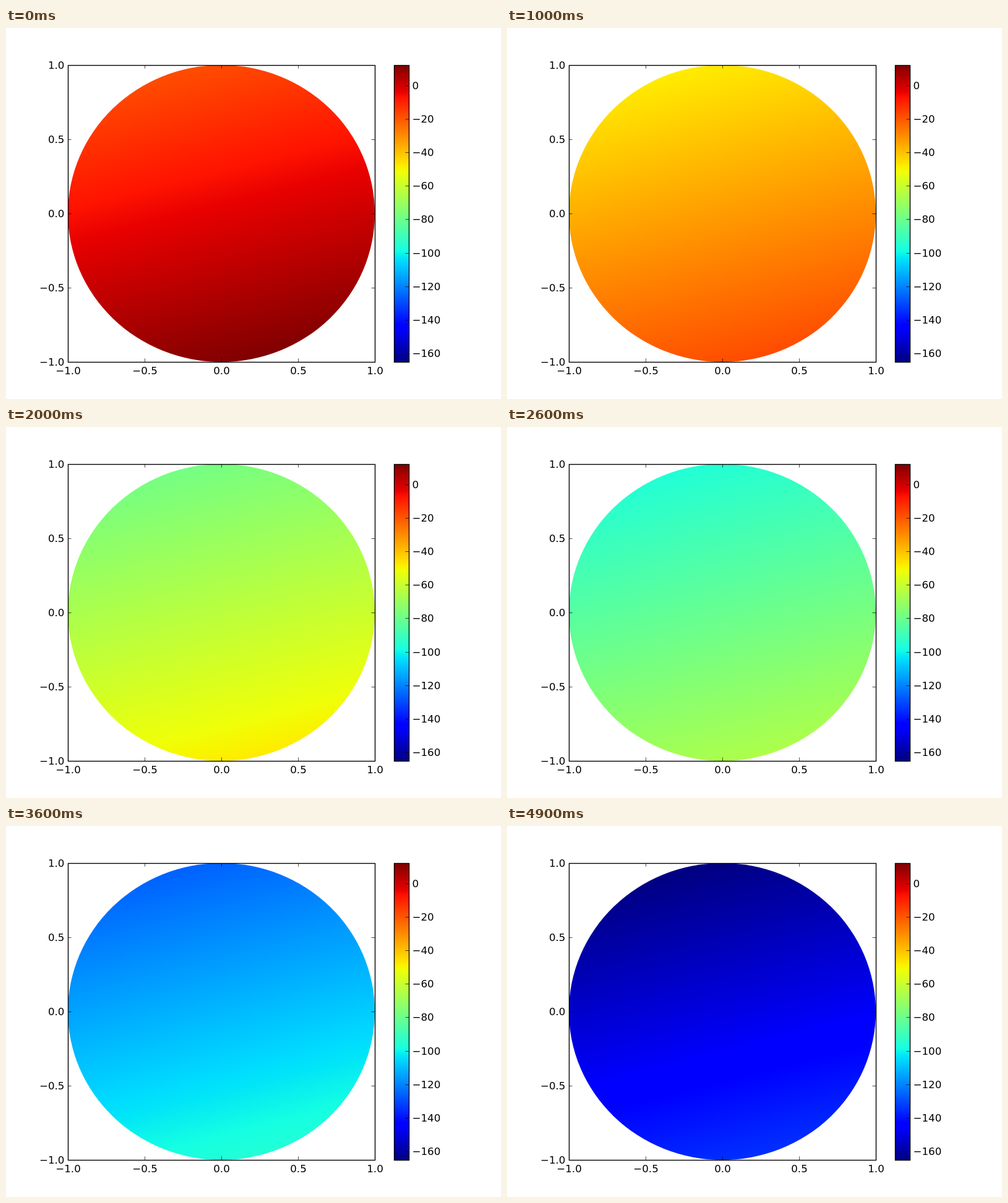
Animation of 800x600 px, one loop 5000 ms. Source, as an HTML page with a canvas:

```html
<!DOCTYPE html>
<html lang="en">
<head>
<meta charset="utf-8">
<title>Tilting field</title>
<style>
  html, body { margin: 0; width: 100%; height: 100%; overflow: hidden; background: #fff; }
  canvas { display: block; }
</style>
</head>
<body>
<canvas id="stage" width="800" height="600"></canvas>
<script>
const ctx = document.getElementById('stage').getContext('2d');
const LOOP = 5000, STEP = 100;
const MIN = -165.2, MAX = 12.2;
const CX = 348, CY = 300, RX = 248, RY = 240;
const LEFT = CX - RX, TOP = CY - RY;
const BAR_X = 627, BAR_W = 24, TICK = 5.56;

// Field slope per pixel
const GX = 3.8 / RX, GY = 14.7 / RY, G2 = GX * GX + GY * GY;

// Jet colour map: [position, level] corners of each channel
const RED = [[0, 0], [.35, 0], [.66, 1], [.89, 1], [1, .5]];
const GREEN = [[0, 0], [.125, 0], [.375, 1], [.64, 1], [.91, 0], [1, 0]];
const BLUE = [[0, .5], [.11, 1], [.34, 1], [.65, 0], [1, 0]];
const stops = [...new Set([...RED, ...GREEN, ...BLUE].map(p => p[0]))];

function level(channel, u) {
  const i = Math.max(1, channel.findIndex(p => p[0] >= u));
  const [u0, a] = channel[i - 1], [u1, b] = channel[i];
  return Math.round(255 * (a + (b - a) * (u - u0) / (u1 - u0)));
}

function jet(x0, y0, x1, y1) {
  const gradient = ctx.createLinearGradient(x0, y0, x1, y1);
  for (const u of stops) {
    gradient.addColorStop(u, `rgb(${[RED, GREEN, BLUE].map(c => level(c, u))})`);
  }
  return gradient;
}

function line(x, y, dx, dy) {
  ctx.beginPath();
  ctx.moveTo(x, y);
  ctx.lineTo(x + dx, y + dy);
  ctx.stroke();
}

function label(text, x, y, align) {
  ctx.textAlign = align;
  ctx.fillText(text.replace('-', '\u2212'), x, y);
}

function drawField(mean) {
  const at = v => [CX + GX * (v - mean) / G2, CY + GY * (v - mean) / G2];
  ctx.fillStyle = jet(...at(MIN), ...at(MAX));
  ctx.beginPath();
  ctx.ellipse(CX, CY, RX, RY, 0, 0, 2 * Math.PI);
  ctx.fill();
}

function drawAxes() {
  ctx.fillStyle = ctx.strokeStyle = '#000';
  ctx.font = '16.67px "DejaVu Sans", sans-serif';
  ctx.lineWidth = .69;
  for (let v = -1; v <= 1; v += .5) {
    const x = CX + v * RX + .5, y = CY - v * RY + .5;
    line(x, TOP, 0, TICK);
    line(x, TOP + 2 * RY, 0, -TICK);
    line(LEFT, y, TICK, 0);
    line(LEFT + 2 * RX, y, -TICK, 0);
    label(v.toFixed(1), x, 560, 'center');
    label(v.toFixed(1), LEFT - TICK, y + 5.5, 'right');
  }
  ctx.lineWidth = 1.39;
  ctx.strokeRect(LEFT + .5, TOP + .5, 2 * RX, 2 * RY);
}

function drawBar() {
  ctx.fillStyle = jet(0, TOP + 2 * RY, 0, TOP);
  ctx.fillRect(BAR_X, TOP, BAR_W, 2 * RY);
  ctx.fillStyle = '#000';
  ctx.lineWidth = .69;
  for (let v = -160; v <= 0; v += 20) {
    const y = Math.round(TOP + (MAX - v) / (MAX - MIN) * 2 * RY);
    line(BAR_X + BAR_W, y + .5, -TICK, 0);
    label(String(v), BAR_X + BAR_W + TICK, y + 6, 'left');
  }
  ctx.lineWidth = 1.39;
  ctx.strokeRect(BAR_X + .5, TOP + .5, BAR_W, 2 * RY);
}

function draw() {
  const step = Math.floor(performance.now() % LOOP / STEP);
  ctx.fillStyle = '#fff';
  ctx.fillRect(0, 0, 800, 600);
  drawField(-3 - 3 * step);
  drawAxes();
  drawBar();
  requestAnimationFrame(draw);
}
draw();
</script>
</body>
</html>
```
